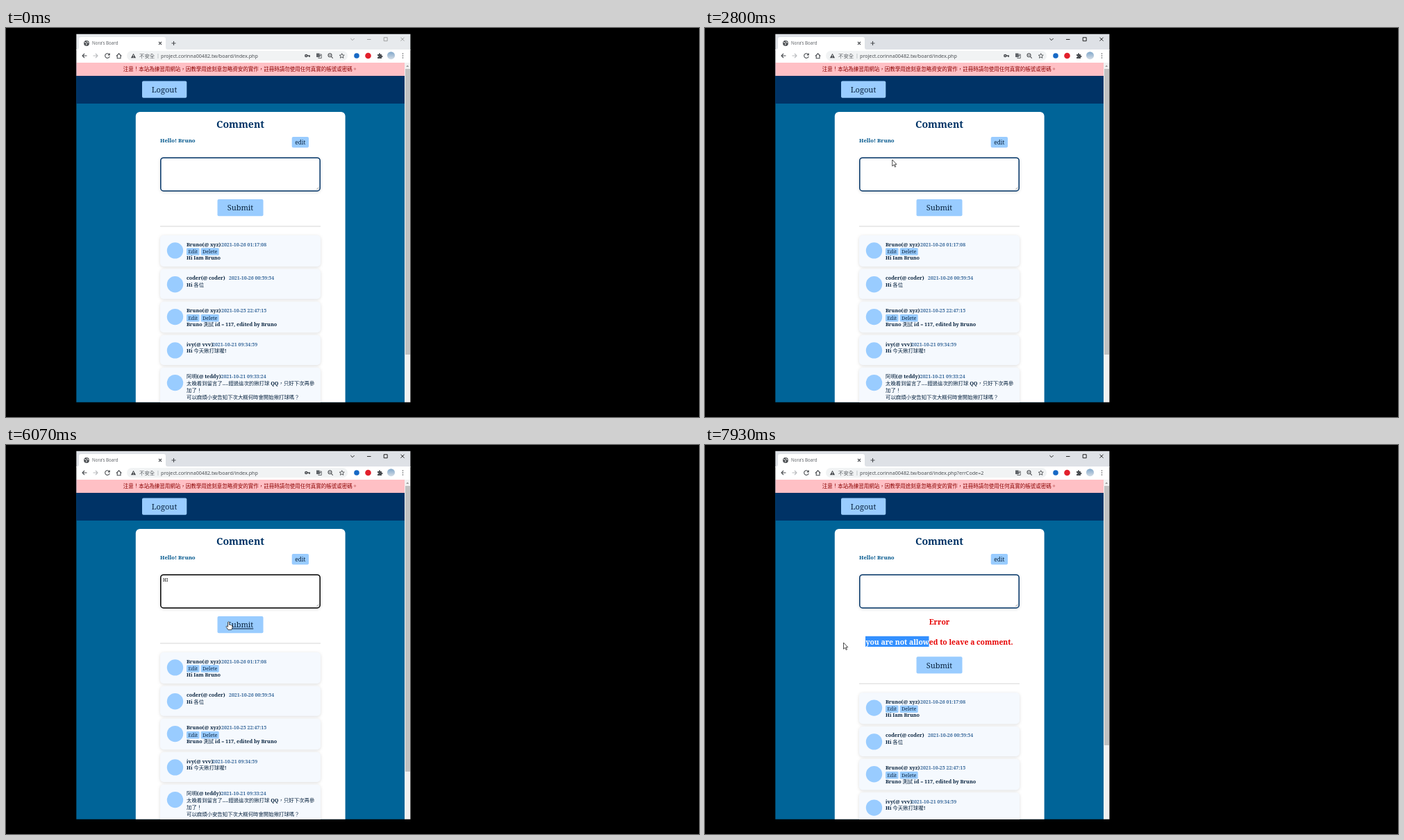
Recreate the animation shown at these times as an HTML page. Size 998 by 561 pixels, loop 8000 ms.

```html
<!DOCTYPE html>
<html lang="zh-TW">
<head>
<meta charset="utf-8">
<title>Message board</title>
<style>
  html, body { margin: 0; width: 100%; height: 100%; overflow: hidden; background: #000; }
  svg { display: block; width: 998px; height: 561px; }
  text { white-space: pre; }
  .ui { font: 7.15px "Noto Sans", "Noto Sans CJK TC", "Noto Sans CJK", sans-serif; fill: #5f6368; }
  .slab { font: 500 7.2px "Noto Serif", "Noto Sans CJK TC", "Noto Sans CJK", serif; fill: #0a2540; }
  .slab .bold { font-weight: 700; }
  .slab .mid { text-anchor: middle; }
  .cjk { font: 400 7.4px "Noto Sans CJK TC", "Noto Sans CJK", sans-serif; }
  .icon { fill: none; stroke: #4a4d51; stroke-width: 1.1; }
  .btn { fill: #9cf; }
  .line { font-weight: 600; }
  .date { font-size: 7px; font-weight: 600; fill: #3a6a9c; }
  .soft { filter: drop-shadow(0 1.5px 2px #0002); }
  .err { font-size: 10.4px; fill: #e60000; }
</style>
</head>
<body>
<svg viewBox="0 0 998 561">
  <defs>
    <clipPath id="window"><path d="M101.300 8.700H582.400V539.700H101.300z"/></clipPath>
    <clipPath id="picked"><rect id="pickClip" y="275.500" height="15.500"/></clipPath>
    <linearGradient id="photo" x2="0" y2="1"><stop stop-color="#7fa6c9"/><stop offset="1" stop-color="#d5dde6"/></linearGradient>
  </defs>
  <g clip-path="url(#window)">
    <!-- browser frame -->
    <path id="frame" d="M101 8H583V32H101z"/>
    <path d="M102 31q3 0 3-3V16q0-3 3-3H227q3 0 3 3V28q0 3 3 3H583V50H101V31z" fill="#fff"/>
    <rect x="174" y="33" width="318" height="14" rx="7" fill="#f1f3f4"/>
    <g id="globe"><circle cx="116" cy="22" r="3.9" fill="#4a4d51"/>
      <path d="M113 20.5l2.4.8 1 1.5-1.2 2M116.500 18.800l.4 1.500 2.300 1" fill="none" stroke="#fff"/></g>
    <circle id="spinner" class="icon" cx="116" cy="22" r="3.4" stroke-dasharray="14 8" style="stroke:#1a73e8"/>
    <g class="ui">
      <text x="124" y="24.400" font-size="6.2">Nora's Board</text>
      <text x="192" y="42.600" font-size="7.4">不安全</text>
      <text x="217" y="42.400" fill="#9aa0a6">|</text>
      <text x="223" y="42.600" fill="#4b4f54">project.corinna00482.tw<tspan id="path"></tspan></text>
    </g>
    <g class="icon">
      <path d="M220 20l4 4m0-4l-4 4M238.500 22h6m-3-3v6"/>
      <path d="M116.500 40h-6.500m3-3l-3 3 3 3"/>
      <path d="M125.500 40h6.500m-3-3l3 3-3 3" stroke="#b9bbbe"/>
      <path id="reload" d="M148.700 38.200a3.300 3.300 0 1 0 .5 2.600M149.200 36.500v2.400h-2.400"/>
      <path id="stop" d="M143 37l6 6m0-6l-6 6"/>
      <path d="M159 40.500l3.600-3.700 3.600 3.700m-6-1v4.200h4.800v-4.200"/>
      <path d="M183.500 36.700l3.600 6.600h-7.200z" fill="#4a4d51" stroke="none"/>
      <path d="M183.500 39v2m0 .8v.9" stroke="#fff" stroke-width=".8"/>
      <g id="key"><circle cx="432.300" cy="40" r="1.500" stroke-width="1.500"/><path d="M434 40h4m-1 0v2" stroke-width="1.500"/></g>
      <path d="M447 36.500h4.500v5.500h-4.500z" fill="#5f6368" stroke="none"/>
      <path d="M451.500 38h2.800v5.500h-4.500v-1M451 39.500h2.500m-1 0q0 2-1.500 2.500" stroke-width=".8"/>
      <circle cx="466.500" cy="39.300" r="2.500"/><path d="M468.500 41.300l2.300 2.300M465.400 39.300h2.200"/>
      <path d="M483.700 36.700l1 2.300 2.500.2-1.900 1.700.6 2.400-2.200-1.300-2.200 1.300.6-2.400-1.900-1.700 2.500-.2z" stroke-width=".9"/>
      <path d="M535 38h2v-.7a1 1 0 0 1 2 0v.7h2v2h.6a1 1 0 0 1 0 2h-.6v2h-6v-2h.5a1 1 0 0 0 0-2H535z" fill="#4a4d51" stroke="none"/>
    </g>
    <circle cx="505" cy="40" r="3.800" fill="#1769c5"/>
    <circle cx="521.500" cy="40" r="4.300" fill="#e2202c"/>
    <circle cx="554.500" cy="39.700" r="5.500" fill="url(#photo)"/>
    <path d="M571.500 37v.1m0 2.900v.1m0 2.900v.1" stroke="#4a4d51" stroke-width="1.500" stroke-linecap="round"/>
    <path id="controls" d="M496.300 15l2.700 2.700 2.700-2.700M520 16.500h5.500M544.200 13.700h5v5h-5zM568.500 13.700l5 5m0-5l-5 5" fill="none" stroke-width=".9"/>

    <!-- page -->
    <path d="M101 50H574V540H101z" fill="#006498"/>
    <path d="M101 50H574V69H101z" fill="#ffc0c5"/>
    <path d="M101 69H574V109H101z" fill="#036"/>
    <path d="M574 50H583V540H574z" fill="#f1f1f1"/>
    <path d="M576.200 56l2-2.400 2 2.400z" fill="#999"/>
    <rect id="thumb" x="575" y="59" width="7" fill="#c1c1c1"/>
    <rect x="186.800" y="121" width="301.800" height="440" rx="6" fill="#fff"/>
    <g class="slab">
      <text class="mid cjk" x="337.500" y="62.300" style="font-size:7.5px;font-weight:500;fill:#8b0000">注意！本站為練習用網站，因教學用途刻意忽略資安的實作，註冊時請勿使用任何真實的帳號或密碼。</text>
      <rect class="btn" x="196" y="76.500" width="64.300" height="24.300" rx="2"/>
      <text class="mid" x="228" y="93" style="font-size:11.1px">Logout</text>
      <text class="mid bold" x="337.500" y="143.500" style="font-size:14.1px;fill:#036">Comment</text>
      <text class="bold" x="222" y="164.700" style="font-size:7.8px;fill:#00568c">Hello! Bruno</text>
      <rect class="btn" x="411.700" y="157" width="24.300" height="15.500" rx="2"/>
      <text class="mid" x="423.800" y="167.600" style="font-size:8.3px">edit</text>
      <rect id="box" class="soft" x="222.800" y="187.200" width="229.400" height="47.700" rx="4" fill="#fff" stroke-width="1.500"/>
      <path d="M447 233l3.500-3.500m-1.500 3.500l1.500-1.500" stroke="#777" stroke-width=".6"/>
      <text id="typed" x="226" y="197" style="font-size:6.2px;fill:#000"></text>
      <path id="caret" d="M0 190v9" stroke="#000" stroke-width=".8"/>
      <g id="error">
        <text class="bold mid err" x="337.500" y="258.700">Error</text>
        <text class="bold mid err" x="337.500" y="287.700">you are not allowed to leave a comment.</text>
        <g clip-path="url(#picked)">
          <path d="M231 275.500H445V291H231z" fill="#3390ff"/>
          <text class="bold mid err" x="337.500" y="287.700" style="fill:#fff">you are not allowed to leave a comment.</text>
        </g>
      </g>
      <g id="below">
        <rect class="btn" x="304.500" y="247" width="66" height="24.300" rx="2"/>
        <text id="submit" class="mid" x="337.500" y="263.400" style="font-size:11px">Submit</text>
        <path d="M222 286H453" stroke="#ccc" stroke-width=".8"/>
        <g id="list"></g>
      </g>
    </g>

    <!-- pointers, each with its hot spot at 0,0 -->
    <g id="beam" fill="none" stroke="#222" stroke-width=".9"><path d="M-2-4.200h1.400L0-3.700.6-4.200H2M0-3.700V3.700M-2 4.200h1.400L0 3.700.6 4.200H2"/></g>
    <path id="arrow" d="M0 0V9.200L2.200 7.200 3.700 10.500 5 9.900 3.600 6.700H6.300z" fill="#fff" stroke="#222" stroke-width=".8"/>
    <path id="hand" d="M-1 .5Q0-.8 1 .5V4.300Q2 3.600 2.600 4.500 3.500 3.900 4.200 4.900 5.400 4.700 5.400 6V8.500L4.400 11.500H-.6L-3.300 7.400Q-3.600 5.800-2.200 6.200L-1 7.300z" fill="#fff" stroke="#222" stroke-width=".8"/>
  </g>
</svg>
<script>
const LOOP = 8000, SHIFT = 58.2, ANCHOR = 322.5;
const $ = id => document.getElementById(id);
const show = (id, on) => { $(id).style.display = on ? '' : 'none'; };
const set = (id, attr, value) => $(id).setAttribute(attr, value);
const clamp = (v, lo, hi) => Math.min(hi, Math.max(lo, v));

// top, height, author, date x, date, lines, editable
const comments = [
  [299, 45, 'Bruno(@ xyz)', 310, '2021-10-26 01:17:08', ['Hi Iam Bruno'], true],
  [347.8, 43, 'coder(@ coder)', 321, '2021-10-26 00:59:54', ['Hi 各位']],
  [394.7, 44.5, 'Bruno(@ xyz)', 310, '2021-10-25 22:47:15', ['Bruno 測試 id = 117, edited by Bruno'], true],
  [443, 43, 'ivy(@ vvv)', 297, '2021-10-21 09:34:59', ['Hi 今天揪打球喔!']],
  [489.7, 62, '阿明(@ teddy)', 309.5, '2021-10-21 09:33:24',
    ['太晚看到留言了....錯過這次的揪打球 QQ，只好下次再參', '加了！', '可以麻煩小安告知下次大概何時會開始揪打球嗎？']],
];
const button = (x, y, w, label) =>
  `<rect class="btn" x="${x}" y="${y}" width="${w}" height="10.5" rx="1.5"/>
   <text class="mid" x="${x + w / 2}" y="${y + 7.8}">${label}</text>`;
const line = (y, text) =>
  `<text class="line" x="260" y="${y}">${text.replace(/[^\x00-\x7f]+/g, '<tspan class="cjk">$&</tspan>')}</text>`;
$('list').innerHTML = comments.map(([y, h, author, dateX, date, lines, editable]) =>
  `<rect class="soft" x="222" y="${y}" width="231" height="${h}" rx="5" fill="#f5f9fe"/>
   <circle class="btn" cx="243.5" cy="${y + 21.9}" r="11.7"/>
   <text class="date" x="${dateX}" y="${y + 15.5}">${date}</text>` +
  line(y + 15.5, author) +
  (editable ? button(260, y + 18.2, 18.5, 'Edit') + button(280.7, y + 18.2, 26, 'Delete') : '') +
  lines.map((text, i) => line(y + 25.3 + 9.8 * (i + !!editable), text)).join('')
).join('');

// time, x, y, pointer shape from that time on
const moves = [
  [1000, 584, 240, 'arrow'], [1400, 292, 168, 'arrow'], [1530, 272, 163, 'beam'], [1730, 250, 163, 'beam'],
  [2000, 270, 163, 'beam'], [2300, 235, 163, 'beam'], [2600, 268, 164, 'beam'], [2700, 270, 172, 'arrow'],
  [3150, 268, 312, 'beam'], [3400, 302, 314, 'beam'], [3600, 292.5, 319, 'beam'], [3670, 296, 307, 'arrow'],
  [4000, 324, 234, 'beam'], [4200, 326.5, 222.5, 'beam'], [5730, 326.5, 222.5, 'beam'], [5860, 324, 236, 'arrow'],
  [5930, 321, 248, 'hand'], [6070, 320.5, 255, 'hand'], [6500, 322, 254, 'hand'], [6740, 322, 254, 'hand'],
  [6820, 322, 270, 'arrow'], [6900, ANCHOR, 283, 'beam'], [7000, ANCHOR, 284, 'beam'], [7280, 444, 290, 'arrow'],
  [7440, 488, 291, 'arrow'], [7540, 444, 289, 'beam'], [7800, 231, 286, 'arrow'], [7930, 199.5, 285, 'arrow'], [LOOP, 199.5, 285, 'arrow'],
];

function pointerAt(t) {
  const next = moves.findIndex(m => m[0] > t);
  if (next < 1) return null;
  const [t0, x0, y0, shape] = moves[next - 1], [t1, x1, y1] = moves[next];
  const k = (t - t0) / (t1 - t0), ease = k * k * (3 - 2 * k);
  return { x: x0 + (x1 - x0) * ease, y: y0 + (y1 - y0) * ease, shape };
}

function draw(t) {
  const active = t >= 1330, failed = t >= 6600, loading = t >= 6330 && !failed;
  const focused = t >= 4270 && !failed;
  const typed = failed || t < 5130 ? '' : t < 5270 ? 'H' : 'HI';
  const blinkStart = t < 5130 ? 4270 : 5270;

  set('frame', 'fill', active ? '#dee1e6' : '#e7eaed');
  set('controls', 'stroke', active ? '#111' : '#999');
  show('globe', !loading);
  show('spinner', loading);
  set('spinner', 'transform', `rotate(${t * .5} 116 22)`);
  show('reload', !loading);
  show('stop', loading);
  show('key', !failed);
  $('path').textContent = '/board/index.php' + (failed ? '?errCode=2' : '');
  set('thumb', 'height', failed ? 374 : 412);

  set('box', 'stroke', focused ? '#000' : '#036');
  $('typed').textContent = typed;
  show('caret', focused && t < 5800 && (t < blinkStart || Math.floor((t - blinkStart) / 530) % 2 === 0));
  set('caret', 'transform', `translate(${226.5 + [0, 4.6, 7][typed.length]})`);
  show('error', failed);
  set('below', 'transform', `translate(0 ${failed ? SHIFT : 0})`);

  const p = pointerAt(t);
  for (const shape of ['beam', 'arrow', 'hand']) show(shape, p && p.shape === shape);
  if (p) set(p.shape, 'transform', `translate(${p.x} ${p.y})`);
  set('submit', 'text-decoration', p && p.shape === 'hand' && !failed ? 'underline' : 'none');

  const end = t >= 7000 ? clamp(p.x, 231, 444) : ANCHOR;
  set('pickClip', 'x', Math.min(end, ANCHOR));
  set('pickClip', 'width', Math.abs(end - ANCHOR));
}

function tick() {
  draw(performance.now() % LOOP);
  requestAnimationFrame(tick);
}
tick();
</script>
</body>
</html>
```
